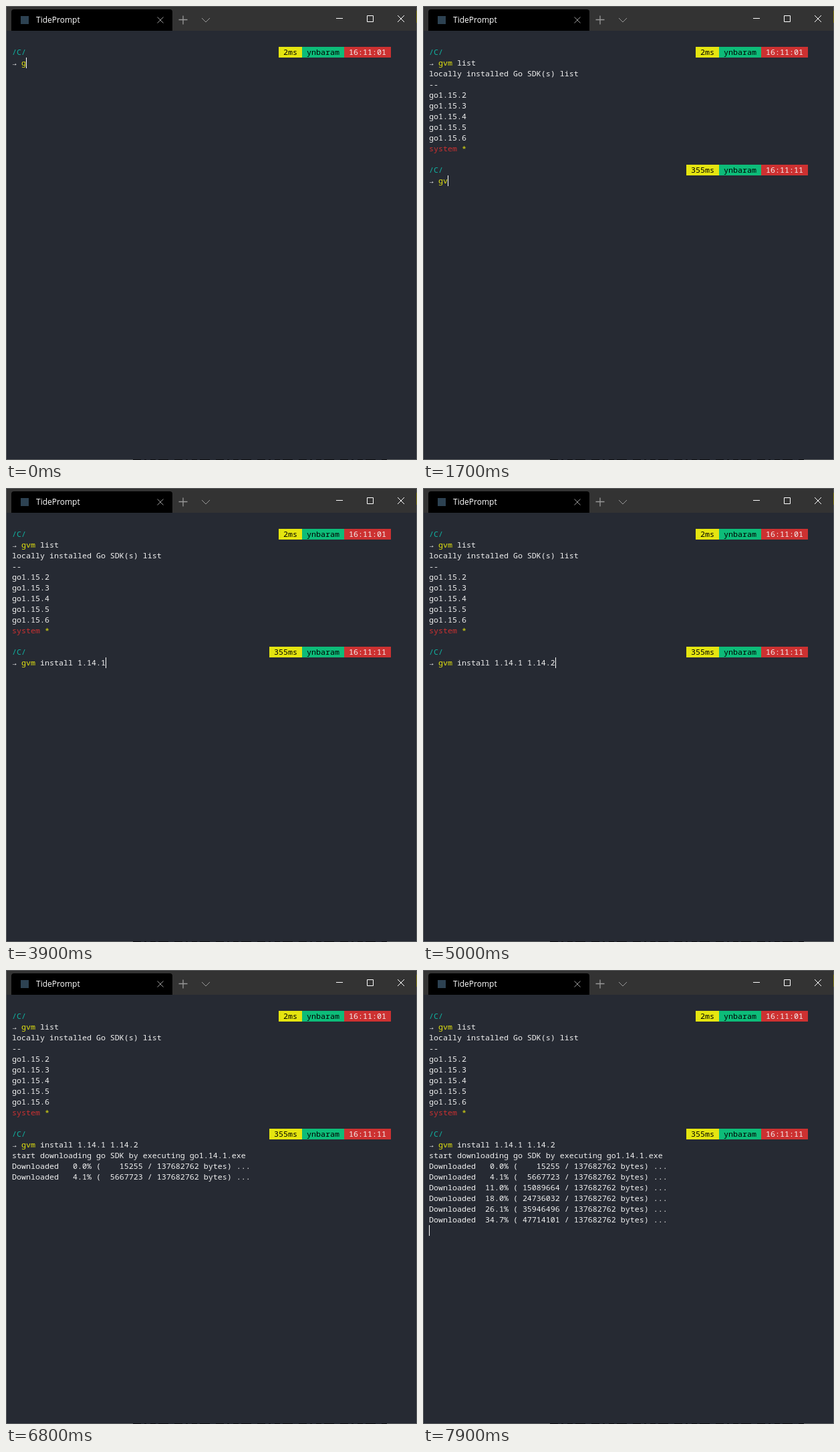
These frames come from a looping animation (615 px wide and 678 px high, 8000 ms). An HTML page:

```html
<!DOCTYPE html>
<html lang="en">
<head>
<meta charset="utf-8">
<title>Terminal</title>
<style>
  html, body { margin: 0; width: 100%; height: 100%; overflow: hidden; background: #262a33; }
  #stage { position: absolute; left: 0; top: 0; width: 615px; height: 678px; overflow: hidden; }
  svg { position: absolute; left: 0; top: 0; }
  #title { position: absolute; left: 45px; top: 13px; color: #fff; font: 12px/16px "Open Sans", sans-serif; }
  #screen {
    position: absolute; left: 9px; top: 61px; width: 567px;
    color: #f2f2f2; white-space: pre;
    font: 11.667px/16px "Noto Sans Mono", monospace;
  }
  .row { position: relative; height: 16px; }
  .badges { position: absolute; right: 0; top: 0; display: flex; color: #000; }
  .badges span { height: 16px; }
  .path { color: #10b3a2; }
  .yellow { color: #e5e510; }
  .red { color: #cd3131; }
  #cursor { position: absolute; width: 1px; height: 16px; background: #fff; }
</style>
</head>
<body>
<div id="stage">
  <svg width="615" height="678" fill="none">
    <path d="M0 0H615V37H0Z" fill="#333"/>
    <path d="M8 37V9Q8 5 12 5H245Q249 5 249 9V37Z" fill="#000"/>
    <path d="M22 15h12v12h-12z" fill="#2d4252"/>
    <path d="M226.5 16.5l9 9m0-9l-9 9" stroke="#999"/>
    <path d="M258.5 20.5h13m-6.5-6v13" stroke="#999" stroke-width="1.3"/>
    <path d="M293 18l6 6 6-6" stroke="#999"/>
    <path d="M494 18.5h10M540.5 14.5h9v9h-9zM586 14l10 10m0-10l-10 10" stroke="#fff"/>
    <path d="M190 677.5H570" stroke="#0c0d10" stroke-dasharray="12 5 3 6 8 4 15 9"/>
    <path d="M.5 .5H614.5V677.5" stroke="#5e6062"/>
    <path d="M.5 0V678M0 677.5H190M570 677.5H615" stroke="#5e6062"/>
    <path d="M614.5 7V25" stroke="#8a8420"/>
  </svg>
  <div id="title">TidePrompt</div>
  <div id="screen"></div>
  <div id="cursor"></div>
</div>
<script>
const LOOP = 8000, STEP = 100, CELL = 7, LINE = 16;
const TOTAL = 137682762;
const received = [15255, 5667723, 15089664, 24736032, 35946496, 47714101];
const FIRST_DOWNLOAD = 6500, DOWNLOAD_GAP = 200;

// Typing speed as [time, characters typed]
const firstTyping = [[0, 1], [900, 8]];
const secondTyping = [[1400, 0], [2300, 7], [2800, 11], [3200, 13], [4100, 20], [5000, 25]];

const screenBox = document.getElementById('screen');
const cursor = document.getElementById('cursor');

const row = html => `<div class="row">${html}</div>`;
const span = (cls, text) => `<span class="${cls}">${text}</span>`;
const badge = (bg, text, ink = '#000') =>
  `<span style="background:${bg};color:${ink}"> ${text} </span>`;

const header = (duration, clock) => row(span('path', '/C/') + '<div class="badges">' +
  badge('#e5e510', duration) + badge('#0dbc79', 'ynbaram') +
  badge('#cd3131', clock, '#f2f2f2') + '</div>');

const prompt = (command, count) => row('→ ' +
  span('yellow', command.slice(0, Math.min(3, count))) + command.slice(3, Math.max(3, count)));

const progress = bytes => 'Downloaded ' + (bytes / TOTAL * 100).toFixed(1).padStart(5) +
  '% (' + String(bytes).padStart(9) + ` / ${TOTAL} bytes) ...`;

function typed(points, time) {
  if (time <= points[0][0]) return points[0][1];
  for (let i = 1; i < points.length; i++) {
    const [t0, n0] = points[i - 1], [t1, n1] = points[i];
    if (time <= t1) return Math.floor(n0 + (n1 - n0) * (time - t0) / (t1 - t0) + 1e-6);
  }
  return points[points.length - 1][1];
}

function cursorVisible(time) {
  // While typing, the cursor blinks off on each step without a new key
  for (const points of [firstTyping, secondTyping]) {
    const start = points[0][0], end = points[points.length - 1][0];
    if (time > start && time <= end) return typed(points, time) > typed(points, time - STEP);
  }
  if (time < 5000 || time === 5900) return true;
  const even = time / STEP % 2 === 0;
  return time < FIRST_DOWNLOAD ? even : !even;
}

function draw(time) {
  const count1 = typed(firstTyping, time), count2 = typed(secondTyping, time);
  const rows = [header('2ms', '16:11:01'), prompt('gvm list', count1)];
  let line = 1, column = 2 + count1;

  if (time >= 1000) { line = 2; column = 0; }
  if (time >= 1200) {
    rows.push(row('locally installed Go SDK(s) list'), row('--'));
    for (let patch = 2; patch <= 6; patch++) rows.push(row('go1.15.' + patch));
    rows.push(row(span('red', 'system') + span('yellow', ' *')));
    line = 10;
  }
  if (time >= 1300) {
    rows.push(row(''), header('355ms', '16:11:11'), prompt('gvm install 1.14.1 1.14.2', count2));
    line = 12;
    column = 2 + count2;
  }
  if (time >= 5400) { line = 13; column = 0; }
  if (time >= 6000) {
    rows.push(row('start downloading go SDK by executing go1.14.1.exe'));
    received.forEach((bytes, i) => {
      if (time >= FIRST_DOWNLOAD + i * DOWNLOAD_GAP) rows.push(row(progress(bytes)));
    });
    line = rows.length;
  }

  screenBox.innerHTML = rows.join('');
  cursor.style.left = 9 + column * CELL + 'px';
  cursor.style.top = 61 + line * LINE + 'px';
  cursor.style.visibility = cursorVisible(time) ? 'visible' : 'hidden';
}

const start = performance.now();
let shown = -1;
function tick() {
  const time = Math.floor((performance.now() - start) % LOOP / STEP) * STEP;
  if (time !== shown) draw(shown = time);
  requestAnimationFrame(tick);
}
tick();
</script>
</body>
</html>
```
